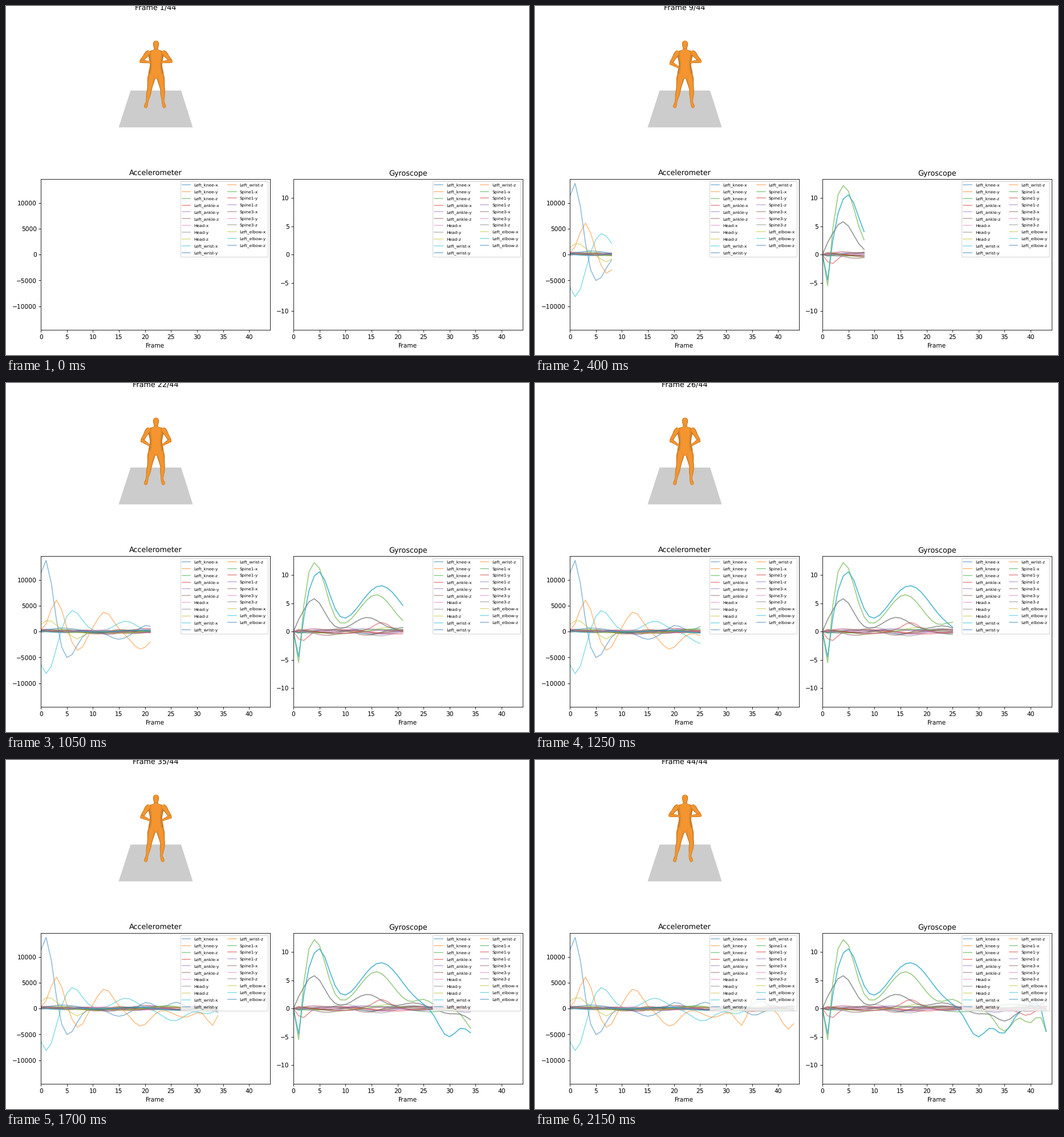
A matplotlib script for the animation above (2.2 s loop, 917 by 611 pixels).

```python
import numpy as np
import matplotlib.pyplot as plt
from matplotlib.animation import FuncAnimation
from matplotlib.collections import PolyCollection

W, H, DPI = 917, 611, 76.4
COUNT = 44
N = np.arange(COUNT)
rng = np.random.default_rng(11)
plt.rcParams["text.hinting"] = "none"

JOINTS = ["Left_knee", "Left_ankle", "Head", "Left_wrist",
          "Spine1", "Spine3", "Left_elbow"]
NAMES = [f"{j}-{a}" for j in JOINTS for a in "xyz"]


# Sensor signals
def drift(size):
    """Slow random wobble of a sensor at rest."""
    period = rng.uniform(7, 26, 4)
    phase = rng.uniform(0, 2 * np.pi, 4)
    return size * np.sin(2 * np.pi * N[:, None] / period + phase).sum(1) / 1.5


def swings(*bumps):
    """Sum of bell-shaped swings (time, height, width)."""
    return sum(h * np.exp(-((N - t) / w) ** 2) for t, h, w in bumps)


accel = {name: drift(240) for name in NAMES}
accel["Left_wrist-x"] = 1000 * swings(
    (1.1, -8.2, 2.2), (6.1, 4.1, 2.4), (16.3, 2, 2.8), (25.5, -2.4, 3),
    (32, -1, 2), (36.5, 1.5, 2))
accel["Left_wrist-y"] = 1000 * swings(
    (.9, 14, 1.95), (5.1, -5.2, 2.3), (15, -1.5, 2.5), (20.3, 1.2, 1.8),
    (26, 1.2, 2), (35.5, -1.3, 2))
accel["Left_wrist-z"] = 1000 * swings(
    (3, 6.1, 1.7), (7.2, -3.7, 1.8), (12.3, 3.8, 2.1), (19.2, -3.4, 2.5),
    (27.5, -1.7, 2.8), (33, -3.3, 1.5), (36, 3.4, 1.6), (42, -4, 1.8))
accel["Left_elbow-x"] += 1000 * swings((1.5, 2, 2), (7, -1.5, 1.5))
accel["Left_elbow-z"] += 1000 * swings((4, .7, 3.5))

gyro = {name: drift(.3) for name in NAMES}
gyro["Left_ankle-x"] += swings((1.8, -1.6, 1.5))
gyro["Spine1-y"] += swings((17, 1.2, 2), (39.5, -1.3, 2))
gyro["Left_wrist-x"] = swings(
    (1, -9.7, .9), (4.1, 12.2, 3), (15.9, 6.5, 4.6), (25, 1.5, 2.2),
    (34.9, -4, 2.4), (39.8, -2.5, 1.8), (43.3, -4.2, 1.1))
gyro["Left_wrist-y"] = swings(
    (1, -6.6, .9), (4.8, 10.5, 3), (16.8, 8.1, 5.6), (29.8, -5, 2.6),
    (34.7, -4.3, 2.3), (40.8, 1.1, 1.3), (43.3, -4.6, .9))
gyro["Left_wrist-z"] = swings(
    (3.9, 5.8, 2.9), (14.2, 2.5, 3.6), (23, 1, 3), (30, -.9, 2.5),
    (35, -2.2, 2.5), (43, 1.2, 1.5))
for axis in "xyz":  # the forearm turns as one piece
    gyro[f"Left_elbow-{axis}"] = gyro[f"Left_wrist-{axis}"]
for name in NAMES:
    gyro[name] = gyro[name] * np.minimum(N, 1)


# Body
MID = 263
LAYERS = ((1, "#c07727"), (.84, "#dc882d"), (.64, "#f4952f"))
TORSO = [(MID, 76.5, 4), (MID, 80, 13), (MID, 88, 13.2), (MID, 103, 10.8),
         (MID, 119, 13.3), (MID, 127, 8)]
HEAD = [(MID, 60.8, 1.2), (MID, 62.5, 4), (MID, 67, 5.2), (MID, 74, 3.8), (MID, 79, 4)]
CHIN = [(MID - 3.5, 73.8, .3), (MID, 75.2, .9), (MID + 3.5, 73.8, .3)]
GROIN = [(MID - 6, 121, .2), (MID, 127, .7), (MID + 6, 121, .2)]


def ease(n, start, end):
    s = np.clip((n - start) / (end - start), 0, 1)
    return s * s * (3 - 2 * s)


def spline(p, per=8):
    """Catmull-Rom curve through the rows of p."""
    p = np.vstack([2 * p[0] - p[1], p, 2 * p[-1] - p[-2]])
    s = np.linspace(0, 1, per, endpoint=False)[:, None]
    parts = [b + s / 2 * (c - a + s * (2 * a - 5 * b + 4 * c - d + s * (3 * (b - c) + d - a)))
             for a, b, c, d in zip(p, p[1:], p[2:], p[3:])]
    return np.vstack(parts + [p[-2:-1]])


def tube(points, scale):
    """Outline around a spine of (x, y, half width) points."""
    x, y, w = spline(np.array(points, float)).T
    dx, dy = np.gradient(x), np.gradient(y)
    k = np.maximum(w, .2) * scale / (np.hypot(dx, dy) + 1e-9)
    side = np.c_[-dy * k, dx * k]
    mid = np.c_[x, y]
    return np.vstack([mid + side, (mid - side)[::-1]])


def between(a, b, *stops):
    """Points (share, half width) along the way from a to b."""
    (ax, ay), (bx, by) = a, b
    return [(ax + (bx - ax) * s, ay + (by - ay) * s, w) for s, w in stops]


def arm(side, drop):
    shoulder = (MID + side * 12.5, 80)
    elbow = (MID + side * (26.2 - 1.8 * drop), 96.5 + 4 * drop)
    hand = (MID + side * (8.8 + 2 * drop), 98.5 + 11 * drop)
    upper = between(shoulder, elbow, (-.05, 3), (.2, 4.6), (.6, 3.5), (.95, 3), (1.15, .8))
    fore = between(elbow, hand, (-.14, .8), (0, 2.9), (.35, 2.8), (.75, 1.9), (.9, 2.2), (1, .7))
    return upper, fore


def leg(side, ankle):
    hip, knee = (MID + side * 7, 119), (MID + side * 11.5, 146)
    heel = (MID + side * ankle, 168)
    toe = (heel[0] + side * 2.8, 178)
    return (between(hip, knee, (0, 6), (.3, 6.8), (.7, 5.2), (1, 4.3))
            + between(knee, heel, (.4, 4), (.75, 2.8), (1, 2.3))
            + between(heel, toe, (.5, 2.9), (.9, 2.7), (1.05, .6)))


def body(n):
    lift = ease(n, 29, 42)
    l_upper, l_fore = arm(-1, ease(n, -1, 11) - lift)
    r_upper, r_fore = arm(1, ease(n, 8, 22) - lift)
    trunk = [l_upper, r_upper, leg(-1, 15.8), leg(1, 12.3 - 3.5 * n / COUNT), HEAD, TORSO]
    polys, colors = [], []

    def add(parts, layers):
        for scale, color in layers:
            for part in parts:
                polys.append(tube(part, scale))
                colors.append(color)

    add(trunk, LAYERS)
    add([CHIN, GROIN], LAYERS[1:2])
    add([l_fore, r_fore], LAYERS)
    return polys, colors


# Figure
fig = plt.figure(figsize=((W + 1e-6) / DPI, (H + 1e-6) / DPI), dpi=DPI, facecolor="white")

stage = fig.add_axes([0, 0, 1, 1])
stage.set(xlim=(0, W), ylim=(H, 0))
stage.axis("off")
stage.fill([218.5, 307, 327.5, 197.5], [148, 148, 212.5, 212.5], color="#cccccc", lw=0)
mesh = stage.add_collection(PolyCollection([], edgecolors="none"))
title = stage.text(262, 6.4, "", fontsize=12, ha="center", va="baseline")


def chart(left, name, limit, ticks):
    ax = fig.add_axes([left / W, 1 - 566.9 / H, 401.5 / W, 263.6 / H])
    ax.set(xlim=(0, COUNT), ylim=(-limit, limit), xlabel="Frame",
           xticks=range(0, 41, 5), yticks=ticks)
    ax.set_title(name)
    lines = [ax.plot([], [], alpha=.5, label=label)[0] for label in NAMES]
    ax.legend(loc="upper right", ncol=2, fontsize=7, labelspacing=.67)
    return lines


plots = [(chart(61.2, "Accelerometer", 14550, range(-10000, 10001, 5000)), accel),
         (chart(504, "Gyroscope", 13.31, range(-10, 11, 5)), gyro)]


def draw(n):
    title.set_text(f"Frame {n + 1}/{COUNT}")
    polys, colors = body(n)
    mesh.set_verts(polys)
    mesh.set_facecolor(colors)
    for lines, data in plots:
        for line, name in zip(lines, NAMES):
            line.set_data(N[:n + 1], data[name][:n + 1])


anim = FuncAnimation(fig, draw, frames=COUNT, interval=50, repeat=True, repeat_delay=0)
plt.show()
```
